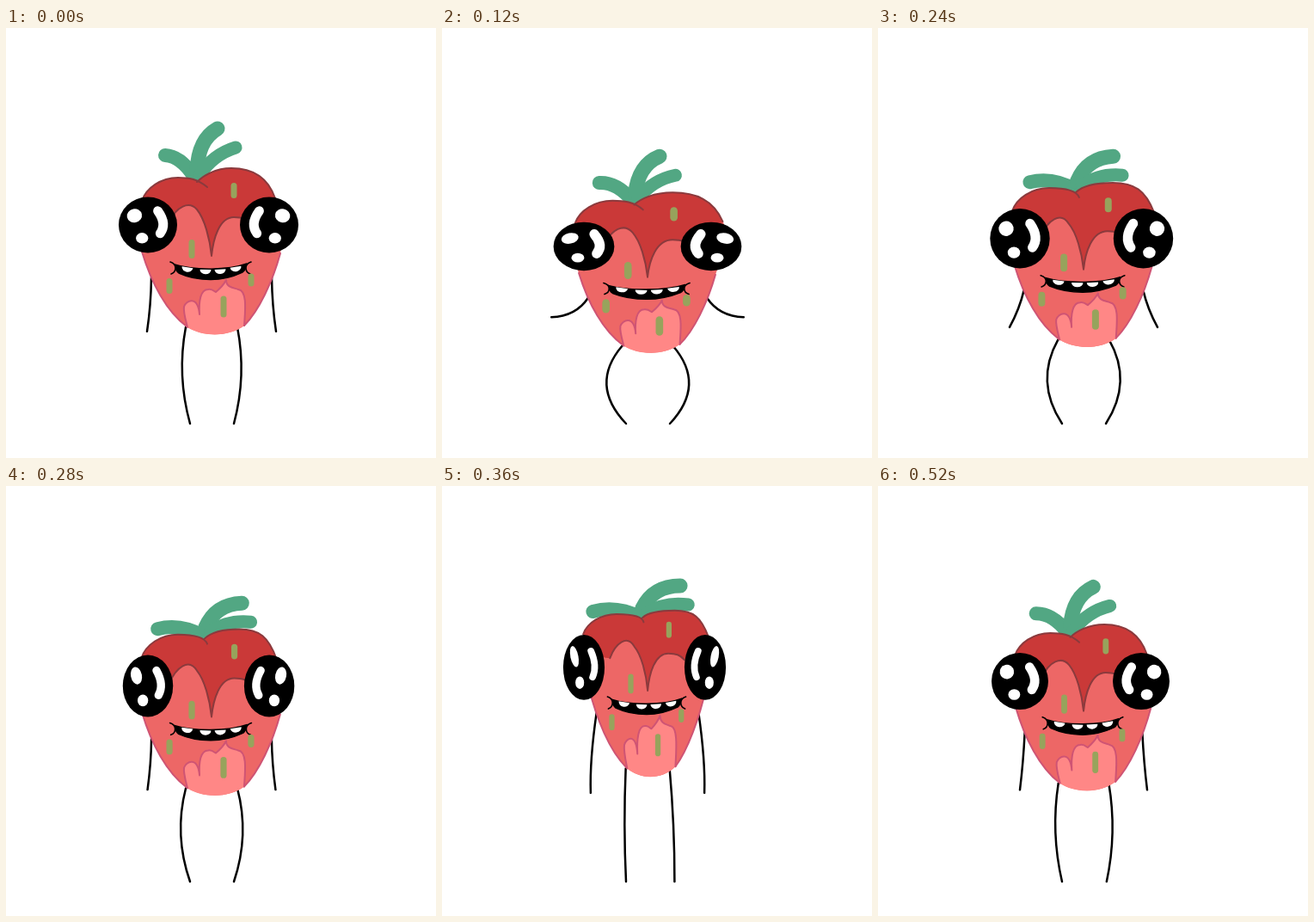
Recreate the animation shown at these times as an HTML page with a canvas. Size 500 by 500 pixels, loop 0.56 s.

```html
<!DOCTYPE html>
<html lang="en">
<head>
<meta charset="utf-8">
<title>Bouncing strawberry</title>
<style>
  html, body { margin: 0; width: 100%; height: 100%; overflow: hidden; background: #fff; }
  canvas { display: block; width: 500px; height: 500px; }
</style>
</head>
<body>
<canvas id="stage" width="500" height="500"></canvas>
<script>
const ctx = document.getElementById('stage').getContext('2d');
const LOOP = 560, STEP = 40, TAU = Math.PI * 2;
const C = {
  leaf: '#52a783', dark: '#ca3938', mid: '#ed6766', pink: '#ff8786',
  rim: '#8b3a3d', edge: '#cf5474', seed: '#97a35c'
};

// Five tracks drive the whole figure.
const TIMES = [0, 80, 200, 240, 320, 380, 440, 520];
const TRACKS = {
  top: [163, 181, 206, 180, 156, 142, 150, 161],
  eyeW: [34, 34, 38, 34.7, 24.5, 24.5, 25.7, 33],
  eyeH: [32.5, 29.5, 27.5, 34.7, 36.5, 38.5, 38.5, 33],
  droop: [0, 0, .85, .95, 1, 1.1, 1.1, .15],
  reach: [7, 36, 48, 18, 0, -2, -3, 6]
};

// Outlines at rest: a start point, then cubic triples.
const LEFT_LOBE = [234, 185, 222, 175, 212, 174, 200, 174, 180, 174, 163, 186, 158, 201];
const LEFT_SIDE = [158, 260, 169, 297, 187, 330, 210, 347];
const RIGHT_SIDE = [277, 346, 294, 329, 310, 295, 319, 262];
const RIGHT_LOBE = [313, 198, 304, 172, 285, 163, 262, 163, 243, 163, 229, 172, 222, 179];
const DRIP = [190, 226, 198, 207, 213, 201, 222, 211, 231, 222, 237, 245, 239, 265,
  241, 245, 248, 220, 265, 220, 275, 220, 280, 222, 286, 228];
const FLAME = [211, 348, 209, 340, 206, 330, 207, 324, 209, 317, 223, 310, 225, 333,
  224, 318, 226, 304, 235, 304, 240, 303, 243, 307, 244, 307,
  250, 302, 253, 299, 256, 293, 256, 302, 265, 302, 270, 304, 281, 305, 278, 330, 277, 346];
const BODY = [...LEFT_LOBE, 154, 215, 152, 240, ...LEFT_SIDE, 228, 359, 258, 360,
  ...RIGHT_SIDE, 323, 240, 318, 205, ...RIGHT_LOBE];
const CAP = [...LEFT_LOBE, 160, 215, 175, 226, ...DRIP, 295, 225, 308, 212, ...RIGHT_LOBE];

// Leaf curves, upright and drooped: base, bend, tip, with y counted from the top of the fruit.
const LEAVES = [
  { up: [218, 9, 203, -14, 185, -15], down: [230, 8, 203, -7, 176, 0], width: 16 },
  { up: [222, 4, 223, -33, 246, -46], down: [232, -2, 244, -29, 275, -30], width: 17 },
  { up: [225, 8, 241, -16, 267, -24], down: [238, 3, 258, -11, 285, -8], width: 15 }
];

// x, y, length
const SEEDS = [[265, 189, 18], [216, 257, 22], [190, 300, 18], [285, 293, 15], [253, 324, 25]];

const mix = (a, b, u) => a + (b - a) * u;

// Smooth cyclic interpolation of one track.
function sample(vals, t) {
  const n = TIMES.length, i = TIMES.findLastIndex(k => k <= t);
  const near = [i - 1, i, i + 1, i + 2];
  const [t0, t1, t2, t3] = near.map(k => TIMES[(k + n) % n] + Math.floor(k / n) * LOOP);
  const [a, b, c, d] = near.map(k => vals[(k + n) % n]);
  const h = t2 - t1, u = (t - t1) / h, v = 1 - u;
  const m1 = (c - a) / (t2 - t0) * h, m2 = (d - b) / (t3 - t1) * h;
  return b * (1 + 2 * u) * v * v + m1 * u * v * v + c * u * u * (3 - 2 * u) - m2 * u * u * v;
}

function poseAt(t) {
  const p = {};
  for (const key in TRACKS) p[key] = sample(TRACKS[key], t);
  p.q = Math.max(-.3, (p.top - 163) / 43);
  p.squash = Math.max(0, p.q);
  p.stretch = Math.min(0, p.q);
  return p;
}

// Moves a point of the resting fruit to its place in the pose.
function warp(x, y, p) {
  const v = (y - 163) / 194;
  const upper = x < 240 ? 1 + .06 * p.squash + .25 * p.stretch : 1 + .28 * p.squash + .15 * p.stretch;
  const lower = 1 - .02 * p.squash + .5 * p.stretch;
  const k = Math.min(1, Math.max(0, (v - .2) / .3));
  const slide = x > 215 && x < 290 && y < 180 ? 9 * p.droop : 0;
  const rise = x < 235 && y < 202 ? 5 * p.droop : 0;
  return [
    240 + (x - 240) * mix(upper, lower, k) + slide,
    p.top + v * (194 - 16 * p.squash ** 2) + 30 * p.stretch * Math.sin(Math.PI * v) - rise
  ];
}

function path(pts) {
  ctx.beginPath();
  ctx.moveTo(pts[0], pts[1]);
  for (let i = 2; i < pts.length; i += 6) ctx.bezierCurveTo(...pts.slice(i, i + 6));
}

function trace(pts, p) {
  path(pts.flatMap((x, i) => i % 2 ? [] : warp(x, pts[i + 1], p)));
}

function fill(color) { ctx.fillStyle = color; ctx.fill(); }

function stroke(color, width) {
  ctx.strokeStyle = color;
  ctx.lineWidth = width;
  ctx.stroke();
}

function curve([x, y, cx, cy, ex, ey], color, width) {
  ctx.beginPath();
  ctx.moveTo(x, y);
  ctx.quadraticCurveTo(cx, cy, ex, ey);
  stroke(color, width);
}

function oval(x, y, a, b, color, turn = 0) {
  ctx.beginPath();
  ctx.ellipse(x, y, a, b, turn, 0, TAU);
  fill(color);
}

function drawLegs(p) {
  const bend = Math.max(3, 13 + 42 * p.q);
  for (const [x, foot, side] of [[209, 214, -1], [269, 265 - 18 * p.stretch, 1]]) {
    const [hx, hy] = warp(x, 348, p);
    curve([hx, hy, (hx + foot) / 2 + side * bend, (hy + 460) / 2, foot, 460], '#000', 2.5);
  }
}

function drawArms(p) {
  const [sx, sy] = warp(169, 290, p);
  const hand = 356 - .45 * p.reach;
  const arm = [sx, sy, 171 - .35 * p.reach, hand - 36 + .8 * p.reach, 171 - p.reach, hand];
  curve(arm, '#000', 2.5);
  curve(arm.map((n, i) => i % 2 ? n : 478 - n), '#000', 2.5);
}

function drawLeaves(p) {
  for (const { up, down, width } of LEAVES) {
    const pts = up.map((n, i) => mix(n, down[i], p.droop) + (i % 2 ? p.top : 0));
    curve(pts, C.leaf, width);
  }
}

function drawBody(p) {
  const line = (pts, color) => { trace(pts, p); stroke(color, 2); };
  trace(BODY, p);
  fill(C.mid);
  trace(CAP, p);
  fill(C.dark);
  line(DRIP, C.rim);
  line(LEFT_SIDE, C.edge);
  line(RIGHT_SIDE, C.edge);
  line(LEFT_LOBE, C.rim);
  line(RIGHT_LOBE, C.rim);
  trace([...FLAME, 258, 360, 228, 359, 211, 348], p);
  fill(C.pink);
  line(FLAME, C.edge);
}

function drawMouth(p) {
  ctx.save();
  ctx.translate(238, warp(238, 274, p)[1]);
  ctx.scale(1 + .1 * p.q, 1 - .12 * p.squash);
  path([-42, 1, -20, 8, 20, 8, 42, 0, 41, 5, 40, 8, 37, 10,
    22, 17, 10, 18.5, 0, 18.5, -10, 18.5, -24, 17, -37, 11, -40, 9, -41, 6, -42, 1]);
  fill('#000');
  stroke('#000', 1.5);
  for (const x of [-27, -6, 11, 29]) {
    ctx.beginPath();
    ctx.ellipse(x, 7 - x * x / 260, 6.5, 5.5, -x / 180, 0, Math.PI);
    fill('#fff');
  }
  for (const s of [-1, 1]) {
    path([s * 47, -2, s * 44, -1, s * 41, 1, s * 41, 5, s * 41, 9, s * 43, 11, s * 46, 12]);
    fill(C.mid);
    stroke('#000', 1.6);
  }
  ctx.restore();
}

function drawSeeds(p) {
  const w = 7 + 2.5 * p.q;
  for (const [sx, sy, len] of SEEDS) {
    const [x, y] = warp(sx, sy, p), h = len * (1 - .15 * p.q);
    ctx.beginPath();
    ctx.roundRect(x - w / 2, y - h / 2, w, h, w / 2);
    fill(C.seed);
  }
}

function drawEye(x, y, side, { eyeW: a, eyeH: b }) {
  const k = (a / b) ** .6;
  ctx.save();
  ctx.translate(x, y);
  ctx.scale(side, 1);
  oval(0, 0, a, b, '#000');
  oval(-.46 * a, -.33 * b, .25 * a * k, .25 * b / k, '#fff', -.2);
  oval(-.2 * a, .47 * b, .21 * a, .19 * b, '#fff');
  curve([.34 * a, -.5 * b, .66 * a, -.04 * b, .42 * a, .3 * b], '#fff', .32 * a);
  ctx.restore();
}

function draw(t) {
  const p = poseAt(t);
  ctx.fillStyle = '#fff';
  ctx.fillRect(0, 0, 500, 500);
  ctx.lineCap = ctx.lineJoin = 'round';
  drawLegs(p);
  drawArms(p);
  drawLeaves(p);
  drawBody(p);
  drawMouth(p);
  drawSeeds(p);
  const spread = p.squash ** 2, y = p.top + 66 - 8 * spread;
  drawEye(165, y, 1, p);
  drawEye(306 + 16 * spread, y, -1, p);
}

const start = performance.now();
function tick() {
  const t = (performance.now() - start) % LOOP;
  draw(Math.floor(t / STEP) * STEP);
  requestAnimationFrame(tick);
}
tick();
</script>
</body>
</html>
```
